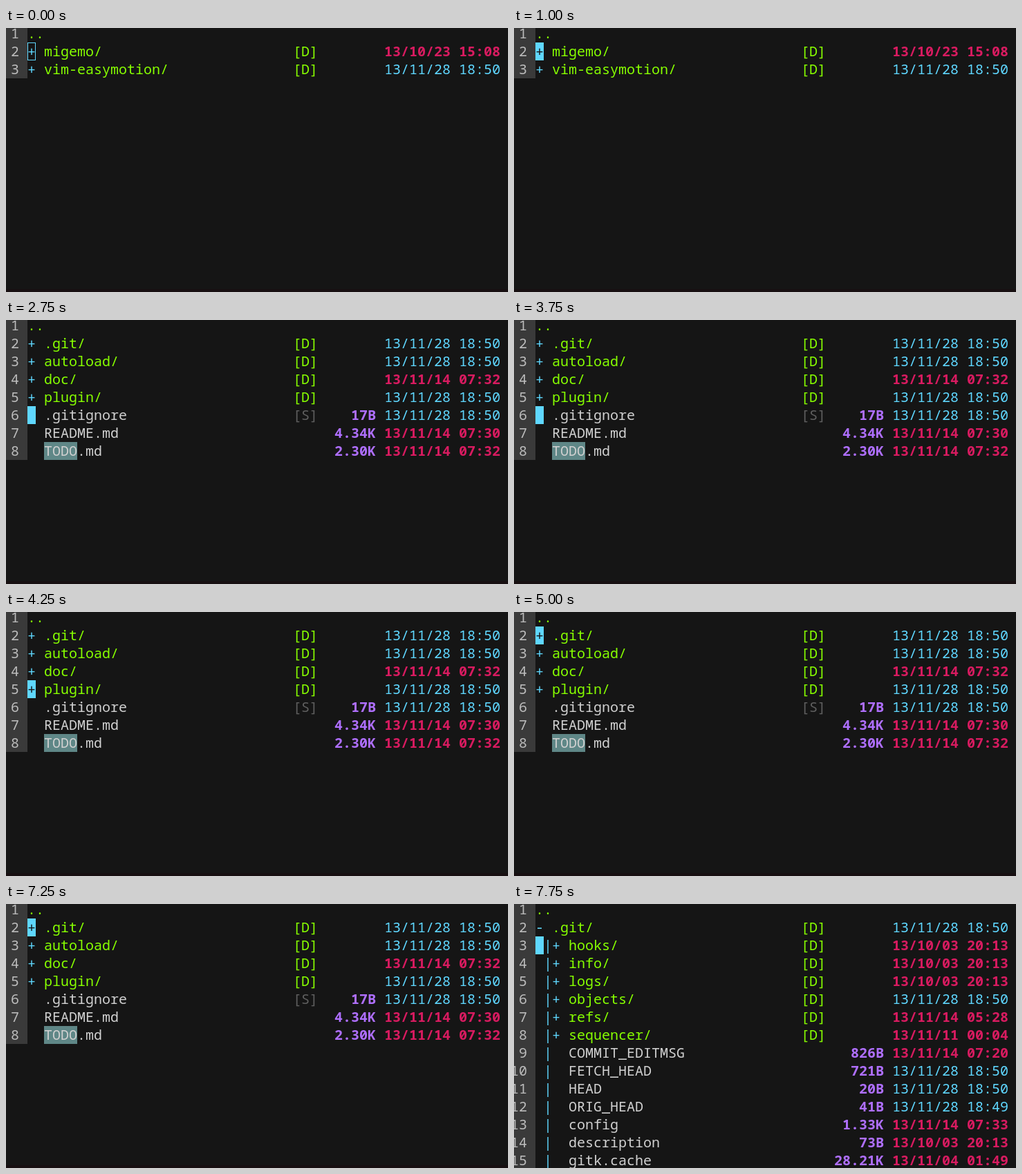
Write an HTML page with a canvas that moves like this. It is 726 by 383 pixels and loops after 8000 ms.

```html
<!DOCTYPE html>
<html>
<head>
<meta charset="utf-8">
<style>
html, body { margin: 0; width: 100%; height: 100%; overflow: hidden; background: #151515; }
canvas { display: block; }
</style>
</head>
<body>
<canvas id="stage" width="726" height="383"></canvas>
<script>
const ctx = document.getElementById('stage').getContext('2d');
const W = 726, H = 383, LEFT = 31, CELL = 12, LINE = 26, LOOP = 8000;
const BG = '#151515', GREEN = '#87ff00', BLUE = '#5fd7ff', PINK = '#d81b60',
      PURPLE = '#af6fff', TEXT = '#d0d0d0', DIM = '#5f5f5f';

// Each entry: tree prefix; name; kind; size; date
const parse = s => s.trim().split('\n').map(row => row.split(';'));
const folder = parse(`
+;migemo/;[D];;13/10/23 15:08
+;vim-easymotion/;[D];;13/11/28 18:50`);
const project = parse(`
+;.git/;[D];;13/11/28 18:50
+;autoload/;[D];;13/11/28 18:50
+;doc/;[D];;13/11/14 07:32
+;plugin/;[D];;13/11/28 18:50
;.gitignore;[S];17B;13/11/28 18:50
;README.md;;4.34K;13/11/14 07:30
;TODO.md;;2.30K;13/11/14 07:32`);
const expanded = parse(`
-;.git/;[D];;13/11/28 18:50
 |+;hooks/;[D];;13/10/03 20:13
 |+;info/;[D];;13/10/03 20:13
 |+;logs/;[D];;13/10/03 20:13
 |+;objects/;[D];;13/11/28 18:50
 |+;refs/;[D];;13/11/14 05:28
 |+;sequencer/;[D];;13/11/11 00:04
 |;COMMIT_EDITMSG;;826B;13/11/14 07:20
 |;FETCH_HEAD;;721B;13/11/28 18:50
 |;HEAD;;20B;13/11/28 18:50
 |;ORIG_HEAD;;41B;13/11/28 18:49
 |;config;;1.33K;13/11/14 07:33
 |;description;;73B;13/10/03 20:13
 |;gitk.cache;;28.21K;13/11/04 01:49`);

// Start time, list, cursor line
const steps = [
  [0, folder, 2], [2250, folder, 3], [2500, project, 6],
  [4250, project, 5], [4500, project, 4], [4750, project, 3], [5000, project, 2],
  [7500, expanded, 2], [7750, expanded, 3]
];

const lineTop = line => line * LINE - 31;

function rect(x, y, w, h, color) {
  ctx.fillStyle = color;
  ctx.fillRect(x, y, w, h);
}

function print(str, col, line, color, weight = 400) {
  ctx.font = `${weight} 20px "Noto Sans Mono", "DejaVu Sans Mono", monospace`;
  ctx.fillStyle = color;
  ctx.fillText(str, LEFT + col * CELL, lineTop(line) + 20);
}

function drawEntry([prefix, name, kind, size, date], line) {
  const col = prefix.includes('|') ? 4 : 2;
  if (name === 'TODO.md') rect(LEFT + 2 * CELL, lineTop(line), 4 * CELL, LINE, '#5f8787');
  print(prefix, 0, line, BLUE);
  print(name, col, line, kind === '[D]' ? GREEN : TEXT);
  print(kind, 32, line, kind === '[D]' ? GREEN : DIM);
  print(size, 42 - size.length, line, PURPLE, 700);
  const recent = date.startsWith('13/11/28');
  print(date, 43, line, recent ? BLUE : PINK, recent ? 500 : 700);
}

function drawCursor(list, line, focused) {
  const y = lineTop(line);
  if (!focused) {
    ctx.strokeStyle = BLUE;
    ctx.lineWidth = 1;
    ctx.strokeRect(LEFT + .5, y + .5, CELL - 1, LINE - 1);
    return;
  }
  rect(LEFT, y, CELL, LINE, BLUE);
  print(list[line - 2][0].charAt(0), 0, line, BG);
}

function draw(t) {
  const [, list, cursor] = steps.findLast(step => step[0] <= t);
  rect(0, 0, W, H, BG);
  if (list !== expanded) rect(0, 379, W, 4, '#170f11');
  rect(0, 0, LEFT, lineTop(list.length + 2), '#3a3a3a');
  for (let n = 1; n <= list.length + 1; n++) {
    print(n, -1 - String(n).length, n, '#bcbcbc');
  }
  print('..', 0, 1, GREEN);
  list.forEach((entry, i) => drawEntry(entry, i + 2));
  drawCursor(list, cursor, t >= 250);
}

const start = performance.now();
function tick() {
  draw((performance.now() - start) % LOOP);
  requestAnimationFrame(tick);
}
tick();
</script>
</body>
</html>
```
